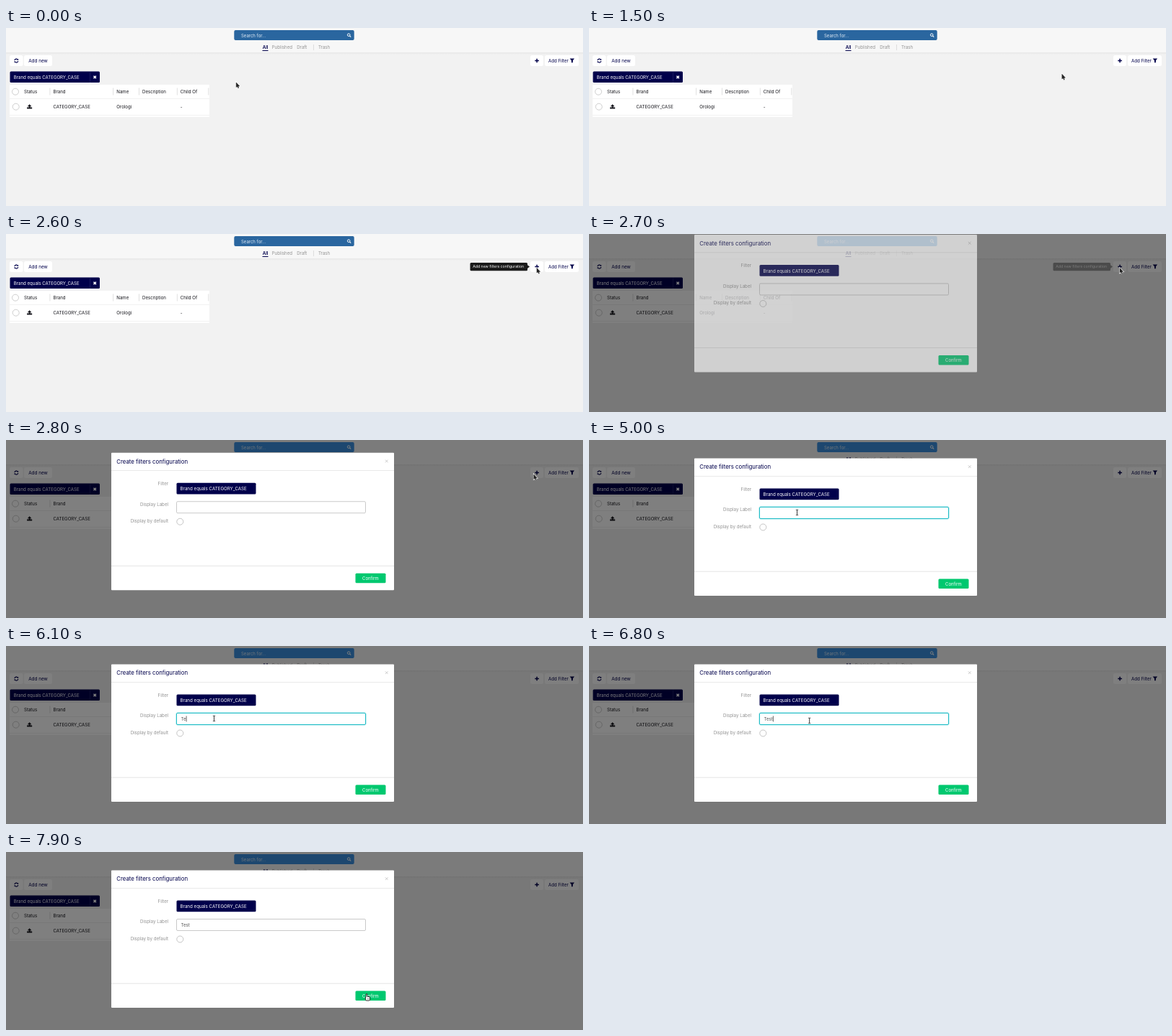
An HTML page with a canvas for the animation above (8 s loop, 800 by 248 pixels).

```html
<!DOCTYPE html>
<html lang="en">
<head>
<meta charset="utf-8">
<title>Create filters configuration</title>
<style>
html, body { margin: 0; width: 100%; height: 100%; overflow: hidden; background: #f2f2f2; }
canvas { display: block; width: 800px; height: 248px; }
</style>
</head>
<body>
<canvas id="stage" width="800" height="248"></canvas>
<script>
const W = 800, H = 248, LOOP = 8000, STEP = 100;
const NAVY = '#00004b', GRAY = '#929292', LINE = '#d2d2d2', INK = '#16161c';
const BRAND = 'CATEGORY_CASE';
const FOCUS = 4400, BLUR = 7800, BLINK = 600, KEYS = [5700, 6100, 6200, 6400];

const stage = document.getElementById('stage').getContext('2d');
const layerCanvas = document.createElement('canvas');
layerCanvas.width = W;
layerCanvas.height = H;
const layer = layerCanvas.getContext('2d');
let ctx = stage;

const ramp = (t, from, to) => Math.max(0, Math.min(1, (t - from) / (to - from)));
const easeInOut = p => p < 0.5 ? 4 * p ** 3 : 1 - 4 * (1 - p) ** 3;

function box(x, y, w, h, fill, radius = 0, stroke, width = 1) {
  ctx.beginPath();
  ctx.roundRect(x, y, w, h, radius);
  if (fill) { ctx.fillStyle = fill; ctx.fill(); }
  if (stroke) { ctx.strokeStyle = stroke; ctx.lineWidth = width; ctx.stroke(); }
}

// Text is placed by the middle of its capitals.
function label(str, x, middle, color = INK, size = 6.1, align = 'left', weight = 400) {
  ctx.font = `${weight} ${size}px Inter, sans-serif`;
  ctx.textAlign = align;
  ctx.fillStyle = color;
  ctx.fillText(str, x, middle + size * 0.37);
}

function line(x1, y1, x2, y2, color, width) {
  ctx.beginPath();
  ctx.moveTo(x1, y1);
  ctx.lineTo(x2, y2);
  ctx.strokeStyle = color;
  ctx.lineWidth = width;
  ctx.stroke();
}

function triangle(x, y, halfWidth, height, color) {
  ctx.beginPath();
  ctx.moveTo(x - halfWidth, y);
  ctx.lineTo(x + halfWidth, y);
  ctx.lineTo(x, y + height);
  ctx.fillStyle = color;
  ctx.fill();
}

function ring(x, y, r, color, width = 0.8, from = 0, to = 2 * Math.PI) {
  ctx.beginPath();
  ctx.arc(x, y, r, from, to);
  ctx.strokeStyle = color;
  ctx.lineWidth = width;
  ctx.stroke();
}

function cross(x, y, r, color, width) {
  line(x - r, y - r, x + r, y + r, color, width);
  line(x - r, y + r, x + r, y - r, color, width);
}

function at(x, y, draw, alpha = 1) {
  ctx.save();
  ctx.translate(x, y);
  ctx.globalAlpha *= alpha;
  draw();
  ctx.restore();
}

// Fades a whole drawing as one sheet, so its parts do not show through each other.
function fadeGroup(alpha, draw) {
  ctx = layer;
  layer.clearRect(0, 0, W, H);
  draw();
  ctx = stage;
  at(0, 0, () => ctx.drawImage(layerCanvas, 0, 0), alpha);
}

function drawHeader(dimmed) {
  const shadow = ctx.createLinearGradient(0, 33, 0, 37);
  shadow.addColorStop(0, '#e3e3e3');
  shadow.addColorStop(1, '#f2f2f2');
  box(0, 33, W, 4, shadow);
  box(0, 0, W, 34, '#f7f7f7');
  box(316.3, 3, 166.4, 14, dimmed ? '#3a90e0' : '#2a669f', 2);
  label('Search for...', 326, 10.3, '#e4edf6', 6);
  ring(475.2, 9.6, 1.8, '#fff', 1);
  line(476.5, 10.9, 478.2, 12.6, '#fff', 1.2);
  label('All', 355.7, 26.9, NAVY, 6.1, 'left', 600);
  box(355.5, 31, 8, 1, NAVY);
  label('Published', 368.7, 26.9, GRAY);
  label('Draft', 403.2, 26.9, GRAY);
  box(426, 23, 0.7, 8, LINE);
  label('Trash', 433, 26.9, GRAY);
}

function drawToolbar() {
  const button = (x, w) => box(x, 38, w, 15, '#fff', 2.5);
  button(5, 18.5);
  for (const turn of [0, Math.PI]) {
    at(14.3, 45.6, () => {
      ctx.rotate(turn);
      ring(0, 0, 2.5, NAVY, 1.1, Math.PI * 1.05, Math.PI * 1.8);
      triangle(2.1, -2, 1.3, 1.7, NAVY);
    });
  }
  button(25, 39);
  label('Add new', 31.2, 45.6, NAVY, 6.4);
  button(727, 18);
  line(733.3, 45.5, 738.9, 45.5, NAVY, 1.5);
  line(736.1, 42.7, 736.1, 48.3, NAVY, 1.5);
  button(747, 47);
  label('Add Filter', 752, 45.6, NAVY);
  triangle(784.9, 42.6, 3.2, 4, NAVY);
  box(784, 44.5, 1.8, 3.8, NAVY);
}

function drawTable() {
  box(5.5, 60.5, 124.5, 15.5, NAVY, 1.5);
  label('Brand equals ' + BRAND, 10.8, 68.7, '#fff');
  box(116, 61, 0.6, 15, '#2b2b68');
  cross(123.2, 68.4, 1.7, '#fff', 1.5);

  const divider = x => box(x, 83.5, 0.7, 10, LINE);
  box(5, 79, 277, 45, '#fff', 1);
  box(5, 98, 277, 0.7, '#ececec');
  box(5, 121, 277, 0.8, '#ececec');
  ring(13, 88.7, 4.5, '#c2c2c2');
  ring(13.7, 109.7, 4.5, '#c2c2c2');
  label('Status', 25, 88.6);
  const columns = [['Brand', 65.5, BRAND], ['Name', 153.3, 'Orologi'], ['Description', 189, ''], ['Child Of', 241.8, '-']];
  for (const [head, x, value] of columns) {
    divider(x - 4.9);
    label(head, x, 88.6);
    label(value, x, 109.3);
  }
  divider(280.5);
  triangle(32.6, 109.2, 2.8, -2.9, INK);
  box(31.8, 108.8, 1.7, 2.2, INK);
  box(29, 110.6, 7.2, 1.9, INK, 0.4);
}

function drawTooltip() {
  box(643.5, 40, 79.5, 11.3, '#1b1b1b', 1.5);
  at(723, 45.6, () => {
    ctx.rotate(-Math.PI / 2);
    triangle(0, 0, 2.4, 3, '#1b1b1b');
  });
  label('Add new filters configuration', 647.2, 45.5, '#fff', 5.2);
}

function drawInput(t) {
  const focus = ramp(t, FOCUS - 70, FOCUS + 200) * (1 - ramp(t, BLUR - 80, BLUR + 100));
  box(236.5, 93.5, 262, 16, '#fff', 1.5, '#c9c9c9');
  at(0, 0, () => {
    box(235.8, 92.8, 263.4, 17.4, null, 2, '#b4ecef');
    box(236.5, 93.5, 262, 16, '#fff', 1.5, '#22bcc6');
  }, focus);

  const typed = KEYS.filter(k => t >= k);
  const text = 'Test'.slice(0, typed.length);
  label(text, 242.6, 101.6, '#555');
  const sinceInput = t - (typed.at(-1) ?? FOCUS);
  const caret = t >= FOCUS && t < BLUR && Math.floor(sinceInput / BLINK) % 2 === 0;
  if (caret) box(242.7 + ctx.measureText(text).width, 97.5, 0.7, 8, '#222');
}

function drawModal(t) {
  box(146, 25.5, 392, 191.5, '#fff', 1);
  box(146, 50, 392, 0.8, '#e2e2e2');
  box(146, 182.8, 392, 0.8, '#dcdcdc');
  label('Create filters configuration', 153.3, 37.4, NAVY, 7.8);
  cross(527.7, 37.2, 1.8, '#c4c4c4', 0.9);
  label('Filter', 225, 68.5, GRAY, 6.1, 'right');
  box(236.5, 67.5, 110, 15.8, NAVY, 1.5);
  label('Brand equals ' + BRAND, 241.5, 75.7, '#fff', 6.2);
  label('Display Label', 225, 97, GRAY, 6.2, 'right');
  label('Display by default', 225, 120.4, GRAY, 6.2, 'right');
  ring(241.3, 121.5, 4.5, '#b5b5b5');
  drawInput(t);
  box(484.5, 193.5, 42, 13.5, '#00c86f', 1.5);
  label('Confirm', 505.4, 200.4, '#fff', 6, 'center');
}

const REST = { x: 319.2, y: 76 }, PLUS = { x: 736, y: 47.5 };
const FIELD = { x: 288.5, y: 101 }, CONFIRM = { x: 500, y: 197.5 };
const moves = [
  { from: REST, to: PLUS, start: 800, end: 1900, sag: 20 },
  { from: PLUS, to: FIELD, start: 2700, end: 3450, sag: 0 },
  { from: FIELD, to: CONFIRM, start: 6500, end: 7600, sag: -19 }
];

function pointer(t) {
  const { from, to, start, end, sag } = moves.findLast(m => t >= m.start) ?? moves[0];
  const p = easeInOut(ramp(t, start, end));
  return {
    x: from.x + (to.x - from.x) * p,
    y: from.y + (to.y - from.y) * p + sag * Math.sin(Math.PI * p)
  };
}

function arrow() {
  for (const [color, width] of [['#fff', 1.6], ['#222', 0.5]]) {
    ctx.beginPath();
    ctx.moveTo(0, 0);
    ctx.lineTo(0, 6.6);
    ctx.lineTo(1.8, 5.2);
    ctx.lineTo(4.6, 4.9);
    ctx.closePath();
    ctx.fillStyle = ctx.strokeStyle = color;
    ctx.lineWidth = width;
    ctx.stroke();
    ctx.fill();
    line(1.8, 4.5, 3.1, 7.8, color, width + 0.9);
  }
}

function beam() {
  line(0, -3.6, 0, 3.6, '#222', 0.9);
  for (const y of [-3.7, 3.7]) line(-1.7, y, 1.7, y, '#222', 0.7);
}

function hand() {
  box(-0.7, 0, 1.6, 7, '#fff', 0.8, '#111', 0.9);
  box(-1.6, 4, 6.3, 5.5, '#fff', 1.5, '#111', 0.9);
  box(-0.3, 2.5, 0.9, 4, '#fff');
  for (const x of [1.6, 3]) line(x, 6, x, 8, '#333', 0.5);
}

function drawPointer(t, modalOpen) {
  const { x, y } = pointer(t);
  const within = (left, top, right, bottom) => modalOpen && x > left && x < right && y > top && y < bottom;
  const shape = within(236, 93, 499, 110) ? beam : within(484, 193, 527, 207) ? hand : arrow;
  at(x, y, shape);
}

function render(t) {
  const open = t >= 2700;
  box(0, 0, W, H, '#f2f2f2');
  drawHeader(open);
  drawToolbar();
  drawTable();
  fadeGroup(ramp(t, 1750, 2050) * (1 - ramp(t, 2600, 2770)), drawTooltip);
  if (open) {
    box(0, 0, W, H, 'rgba(0,0,0,.5)');
    const slide = -48 * (1 - ramp(t, 2600, 2900)) ** 1.66;
    fadeGroup(ramp(t, 2600, 2754), () => at(0, slide, () => drawModal(t)));
  }
  drawPointer(t, t >= 2800);
}

const start = performance.now();
function tick() {
  const t = (performance.now() - start) % LOOP;
  render(Math.floor(t / STEP) * STEP);
  requestAnimationFrame(tick);
}
tick();
</script>
</body>
</html>
```
